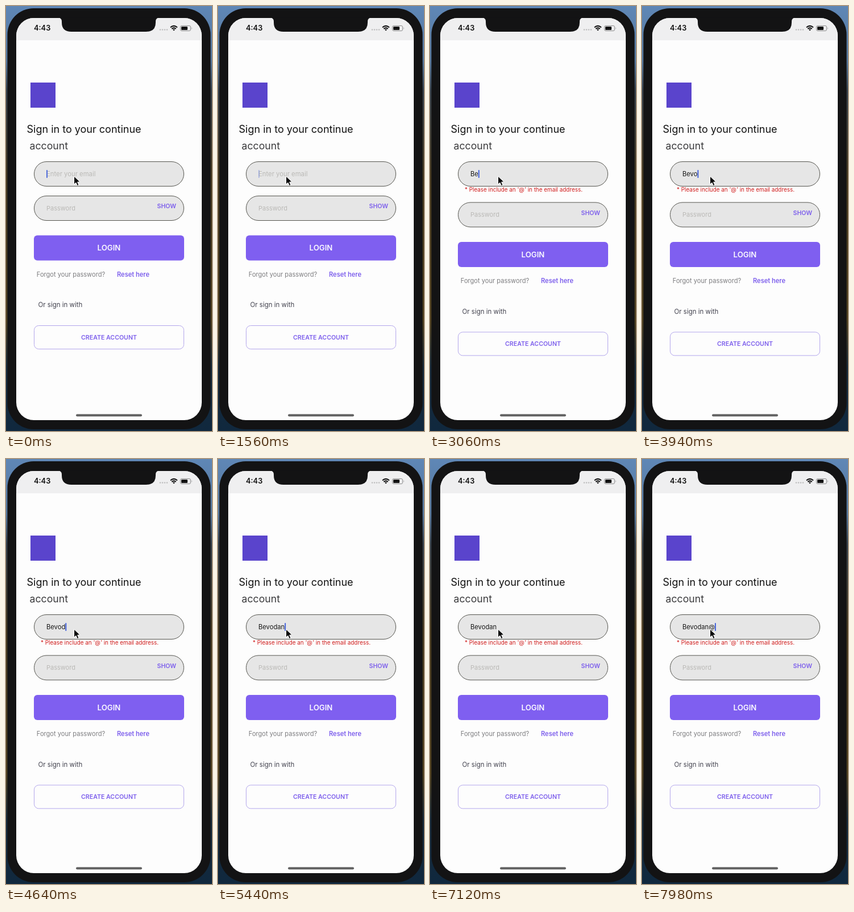
Animation, 362 px wide and 744 px high, one loop 8 s. Source, as an HTML page:

```html
<!DOCTYPE html>
<html lang="en">
<head>
<meta charset="utf-8">
<title>Sign in</title>
<style>
  html, body { margin: 0; width: 100%; height: 100%; overflow: hidden; background: #131314; }
  svg { display: block; width: 100vw; height: 100vh; }
  text { font-family: Inter, "Open Sans", sans-serif; font-size: 11.1px; white-space: pre; }
  .bold { font-weight: 600; fill: #7d5fec; }
  .hint { fill: #bab9b6; font-size: 11.3px; }
  .field { fill: #e6e6e6; stroke: #55554f; }
</style>
</head>
<body>
<svg viewBox="0 0 362 744">
  <defs>
    <linearGradient id="scene" x2="0" y2="1">
      <stop offset="0" stop-color="#5f87b6"/>
      <stop offset=".13" stop-color="#56789e"/>
      <stop offset=".2" stop-color="#38424c"/>
      <stop offset=".4" stop-color="#46391f"/>
      <stop offset=".74" stop-color="#51411f"/>
      <stop offset=".85" stop-color="#172a3a"/>
      <stop offset="1" stop-color="#10283e"/>
    </linearGradient>
    <clipPath id="screen"><rect x="18" y="21" width="326" height="704" rx="31"/></clipPath>
  </defs>

  <rect width="362" height="744" fill="url(#scene)"/>
  <rect x="2.5" y="4" width="357" height="737" rx="46" fill="#131314"/>
  <g clip-path="url(#screen)">
    <rect x="18" y="21" width="326" height="704" fill="#fdfdfd"/>
    <rect x="18" y="21" width="326" height="39" fill="#efeff0"/>
  </g>
  <path d="M92 20.5Q98 21 98 27V29Q98 45 115 45H246Q263 45 263 29V27Q263 21 269 20.5Z" fill="#131314"/>

  <text x="49" y="43.3" style="font-size:12.8px;font-weight:600" fill="#111">4:43</text>
  <g fill="#bfbfbf">
    <circle cx="271" cy="41.5" r="1.3"/><circle cx="275" cy="41.5" r="1.3"/>
    <circle cx="279" cy="41.5" r="1.3"/><circle cx="283" cy="41.5" r="1.3"/>
  </g>
  <g fill="none" stroke="#111" stroke-width="2">
    <path d="M289 37.5Q295 32.3 301 37.5M291.3 40Q295 36.8 298.7 40"/>
    <path d="M293 41.2Q295 39.8 297 41.2L295 43.4Z" fill="#111" stroke="none"/>
  </g>
  <rect x="306.5" y="34.5" width="18" height="9" rx="2.5" fill="none" stroke="#8c8c8c"/>
  <rect x="308" y="36" width="11" height="6" rx="1.2" fill="#111"/>
  <path d="M326 37.3Q327.5 39 326 40.7Z" fill="#8c8c8c"/>

  <rect x="43" y="134" width="44" height="44" fill="#5a44cc"/>

  <text x="36.5" y="222" style="font-size:18px" fill="#111">Sign in to your continue</text>
  <text x="41.5" y="251" style="font-size:17.7px" fill="#3a3a3c">account</text>

  <rect class="field" x="49.5" y="272.5" width="263" height="43" rx="21.5"/>
  <text class="hint" id="hint" x="71" y="298">Enter your email</text>
  <text id="email" x="71" y="298" style="font-size:11.2px" fill="#181818"></text>
  <rect id="caret" y="287" width="2" height="14" rx=".8" fill="#4664dc"/>
  <text id="error" x="61" y="324.8" style="font-size:9.9px" fill="#d01c1c">* Please include an '@' in the email address.</text>

  <g id="lower">
    <rect class="field" x="49.5" y="332.5" width="263" height="43" rx="21.5"/>
    <text class="hint" x="71" y="358" style="font-size:11px">Password</text>
    <text class="bold" x="265.5" y="354.3" style="font-size:10.6px">SHOW</text>
    <rect x="49" y="401.5" width="264" height="44" rx="6" fill="#7f5ff0"/>
    <text x="181" y="428.3" text-anchor="middle" style="font-size:13.2px;font-weight:600" fill="#fbfaff">LOGIN</text>
    <text x="53.8" y="474" fill="#7e7e80">Forgot your password?</text>
    <text class="bold" x="195" y="474">Reset here</text>
    <text x="56.5" y="527.3" style="font-size:11.5px" fill="#43434f">Or sign in with</text>
    <rect x="49.5" y="559.5" width="263" height="41" rx="8" fill="none" stroke="#b3a6ec"/>
    <text class="bold" x="181" y="584" text-anchor="middle" style="font-size:10.6px">CREATE ACCOUNT</text>
  </g>

  <rect x="123" y="714.5" width="116" height="4" rx="2" fill="#606060"/>
  <path d="M119.5 298V312.3L122.9 309.2L125.3 314.6L128 313.4L125.6 308.2L130 307.9Z"
        fill="#0b0b0b" stroke="#fff" stroke-width="1"/>
</svg>
<script>
const LOOP = 8000, SHIFT = 11.4;
const NAME = 'Bevodan', SIGN = '@';
const FOCUSED = -1520, TYPE_AT = 2200, KEY_GAP = 500, SIGN_AT = 7600;
const $ = id => document.getElementById(id);
const [hint, email, caret, error, lower] = ['hint', 'email', 'caret', 'error', 'lower'].map($);
const show = (el, on) => el.setAttribute('visibility', on ? 'visible' : 'hidden');

// Solid after a key, then fades out and in once a second.
function blink(idle) {
  if (idle < 500) return 1;
  const p = idle % 1000;
  return p < 500 ? Math.min(1, p / 250) : Math.max(0, (750 - p) / 250);
}

function typing(t) {
  if (t < TYPE_AT) return { text: '', last: FOCUSED };
  if (t >= SIGN_AT) return { text: NAME + SIGN, last: SIGN_AT };
  const key = Math.min(NAME.length - 1, Math.floor((t - TYPE_AT) / KEY_GAP));
  return { text: NAME.slice(0, key + 1), last: TYPE_AT + key * KEY_GAP };
}

function draw(t) {
  const { text, last } = typing(t);
  if (email.textContent !== text) email.textContent = text;
  show(hint, !text);
  show(error, text);
  lower.setAttribute('transform', `translate(0 ${text ? SHIFT : 0})`);
  caret.setAttribute('x', 71 + (text ? email.getComputedTextLength() : 0));
  caret.setAttribute('opacity', blink(t - last));
}

const start = performance.now();
function tick() {
  draw((performance.now() - start) % LOOP);
  requestAnimationFrame(tick);
}
tick();
</script>
</body>
</html>
```
